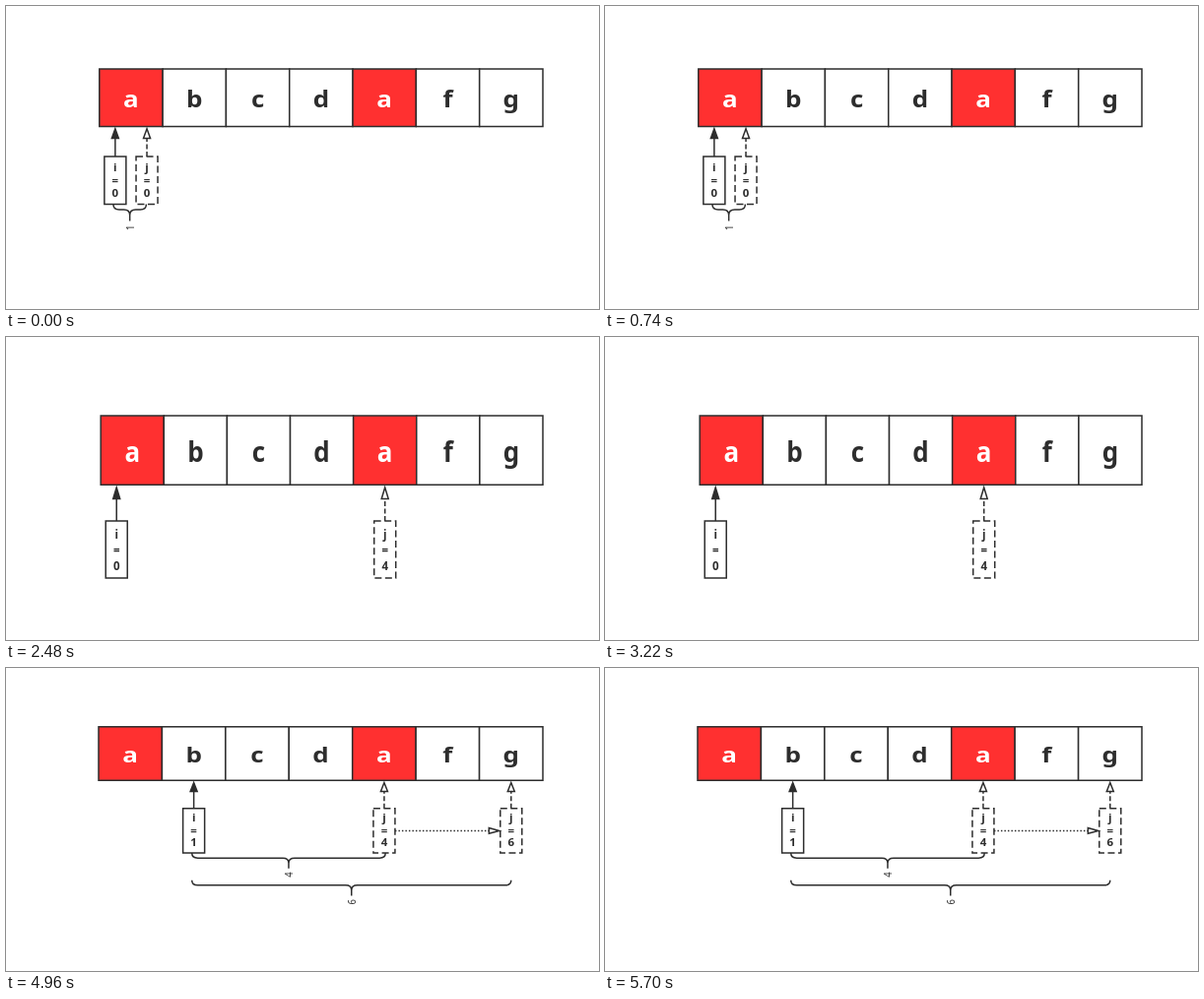
An HTML page that plays this animation: 602 by 308 pixels, repeating every 6.2 s.

```html
<!DOCTYPE html>
<html lang="en">
<head>
<meta charset="utf-8">
<title>Sliding window</title>
<style>
  html, body { margin: 0; width: 100%; height: 100%; overflow: hidden; background: #fff; }
  svg { display: block; width: 602px; height: 308px; }
  .slide { display: none; }
  .slide.on { display: inline; }
  rect, path { fill: #fff; stroke: #2d2d2d; stroke-width: 1.5; vector-effect: non-scaling-stroke; }
  .line { fill: none; }
  .solid { fill: #2d2d2d; }
  .hot { fill: #ff3030; }
  .dash { stroke-dasharray: 7 3.5; }
  .stem { stroke-dasharray: 5 2.5; }
  .dots { stroke-dasharray: 1.5 2; }
  text { font-family: "Noto Sans", "Open Sans", sans-serif; fill: #2d2d2d; text-anchor: middle; }
  .letter { font-size: 26px; font-weight: 700; }
  .letter.light { fill: #fff; }
  .note { font-size: 11.5px; font-weight: 700; }
  .count { font-size: 11px; }
</style>
</head>
<body>
<svg id="stage" viewBox="0 0 602 308"></svg>
<script>
const STEP = 1240;
const RIGHT = 545;
const CELL = 64;
const BOX_TOP = 97.5;
const BOX_END = 150.5;
const WORD = "abcdafg";

// Pointers: [name, value, cell position]; braces: [from, to, top, label].
// Positions count cells from the left edge of the row.
const slides = [
  { left: 94.8, top: 64, scale: 0.914,
    pointers: [["i", 0, 0.25], ["j", 0, 0.75]],
    braces: [[0.22, 0.74, BOX_END, 1]] },
  { left: 94.8, top: 59.2, scale: 0.85,
    pointers: [["i", 0, 0.25], ["j", 1, 1.5], ["j", 3, 3.5]],
    braces: [[0.21, 1.51, BOX_END, 2], [0.21, 3.52, 185, 4]],
    move: [1.5, 3.5] },
  { left: 96.2, top: 80, scale: 1.097,
    pointers: [["i", 0, 0.25], ["j", 4, 4.5]],
    braces: [] },
  { left: 94.8, top: 64, scale: 0.945,
    pointers: [["i", 1, 1.5], ["j", 4, 4.5]],
    braces: [[1.47, 4.52, BOX_END, 4]] },
  { left: 94, top: 59.8, scale: 0.852,
    pointers: [["i", 1, 1.5], ["j", 4, 4.5], ["j", 6, 6.5]],
    braces: [[1.47, 4.52, BOX_END, 4], [1.47, 6.5, 183, 6]],
    move: [4.5, 6.5] }
];

function add(parent, tag, attrs, content) {
  const node = document.createElementNS("http://www.w3.org/2000/svg", tag);
  for (const key in attrs) node.setAttribute(key, attrs[key]);
  if (content !== undefined) node.textContent = content;
  parent.append(node);
  return node;
}

function drawRow(g, width) {
  [...WORD].forEach((char, n) => {
    const hot = char === "a";
    const x = n * width;
    add(g, "rect", { x, y: 0, width, height: CELL, class: hot ? "hot" : "" });
    add(g, "text", { x: x + width / 2, y: 42.4, class: hot ? "letter light" : "letter" }, char);
  });
}

function drawPointer(g, x, name, value) {
  const fast = name === "j";
  add(g, "path", { d: `M${x} ${BOX_TOP}V77`, class: fast ? "line stem" : "line" });
  add(g, "path", { d: `M${x} 66.5L${x + 3.5} 77H${x - 3.5}Z`, class: fast ? "" : "solid" });
  add(g, "rect", { x: x - 11, y: BOX_TOP, width: 22, height: BOX_END - BOX_TOP, class: fast ? "dash" : "" });
  [name, "=", value].forEach((line, n) =>
    add(g, "text", { x, y: BOX_TOP + 16 + n * 14.6, class: "note" }, line));
}

function drawBrace(g, from, to, y, label) {
  const mid = (from + to) / 2;
  add(g, "path", {
    d: `M${from} ${y}q0 6 6 6H${mid - 6}q6 0 6 6V${y + 18.5}V${y + 12}q0 -6 6 -6H${to - 6}q6 0 6 -6`,
    class: "line"
  });
  add(g, "text", { transform: `translate(${mid + 4} ${y + 26}) rotate(-90)`, class: "count" }, label);
}

function drawMove(g, from, to) {
  const y = (BOX_TOP + BOX_END) / 2;
  add(g, "path", { d: `M${from} ${y}H${to - 11}`, class: "line dots" });
  add(g, "path", { d: `M${to - 1} ${y}l-10.5 -3.4v6.8Z` });
}

const stage = document.getElementById("stage");
const groups = slides.map(({ left, top, scale, pointers, braces, move }) => {
  const width = (RIGHT - left) / WORD.length;
  const g = add(stage, "g", { class: "slide", transform: `translate(${left} ${top}) scale(1 ${scale})` });
  drawRow(g, width);
  for (const [name, value, at] of pointers) drawPointer(g, at * width, name, value);
  for (const [from, to, y, label] of braces) drawBrace(g, from * width, to * width, y, label);
  if (move) drawMove(g, move[0] * width + 11, move[1] * width - 11);
  return g;
});

const start = performance.now();
function render() {
  const now = Math.floor((performance.now() - start) / STEP) % groups.length;
  groups.forEach((g, n) => g.classList.toggle("on", n === now));
  requestAnimationFrame(render);
}
render();
</script>
</body>
</html>
```
